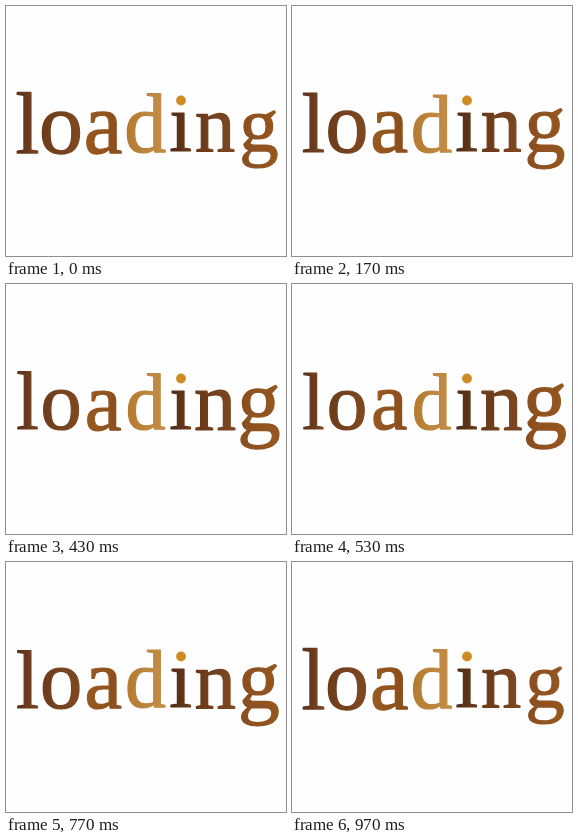
An HTML page with a canvas that plays this animation: 280 by 250 pixels, repeating every 1 s.

```html
<!DOCTYPE html>
<html lang="en">
<head>
<meta charset="utf-8">
<title>loading</title>
<style>
html, body { margin: 0; width: 100%; height: 100%; overflow: hidden; background: #fefefe; }
canvas { display: block; width: 280px; height: 250px; }
</style>
</head>
<body>
<canvas id="stage" role="img" aria-label="loading"></canvas>
<script>
const W = 280, H = 250, LOOP = 1000, BASE = 145.4;
const canvas = document.getElementById('stage');
const ctx = canvas.getContext('2d');
const dpr = window.devicePixelRatio || 1;
canvas.width = W * dpr;
canvas.height = H * dpr;

// glyph, centre x, scale at both ends of the swing, left and right colour
const letters = [
  ['l', 21.6, 1.05, 0.98, '#5a3018', '#7a4722'],
  ['o', 55, 1.07, 0.99, '#6c3c1b', '#7e4821'],
  ['a', 98, 1.06, 1, '#97591f', '#8a4d1c'],
  ['d', 140, 1.03, 0.97, '#b47b30', '#c48d48'],
  ['ı', 174.8, 1, 1, '#4e2a16', '#6b3c1c'],
  ['n', 209.2, 0.98, 1.04, '#683818', '#7e4822'],
  ['g', 254, 0.96, 1.08, '#8a4e1f', '#96571f']
];

const clamp = v => Math.min(1, Math.max(0, v));
const mix = (a, b, k) => a + (b - a) * k;

// 0 = weight on the left, 1 = weight on the right
function swing(t) {
  return t < 550 ? clamp((t - 10) / 520) : 1 - clamp((t - 560) / 420);
}

function drawLetter([glyph, cx, from, to, left, right], k) {
  const m = ctx.measureText(glyph);
  const half = (m.actualBoundingBoxRight + m.actualBoundingBoxLeft) / 2;
  const x = (m.actualBoundingBoxLeft - m.actualBoundingBoxRight) / 2;
  const y = (m.actualBoundingBoxAscent - m.actualBoundingBoxDescent) / 2;
  const s = mix(from, to, k);
  const paint = ctx.createLinearGradient(-half, 0, half, 0);
  paint.addColorStop(0, left);
  paint.addColorStop(1, right);
  ctx.save();
  ctx.translate(cx, BASE - y);
  ctx.scale(s, s);
  ctx.fillStyle = ctx.strokeStyle = paint;
  ctx.fillText(glyph, x, y);
  ctx.strokeText(glyph, x, y);
  ctx.restore();
}

function draw(t) {
  const k = swing(t);
  ctx.setTransform(dpr, 0, 0, dpr, 0, 0);
  ctx.fillStyle = '#fefefe';
  ctx.fillRect(0, 0, W, H);
  ctx.font = '82px "Liberation Serif", serif';
  ctx.lineWidth = 1.2;
  ctx.lineJoin = 'round';
  letters.forEach(l => drawLetter(l, k));
  ctx.fillStyle = '#d08c24';
  ctx.beginPath();
  ctx.arc(175, 94.5, 4.9, 0, Math.PI * 2);
  ctx.fill();
}

const start = performance.now();
function tick() {
  draw((performance.now() - start) % LOOP);
  requestAnimationFrame(tick);
}
tick();
</script>
</body>
</html>
```
